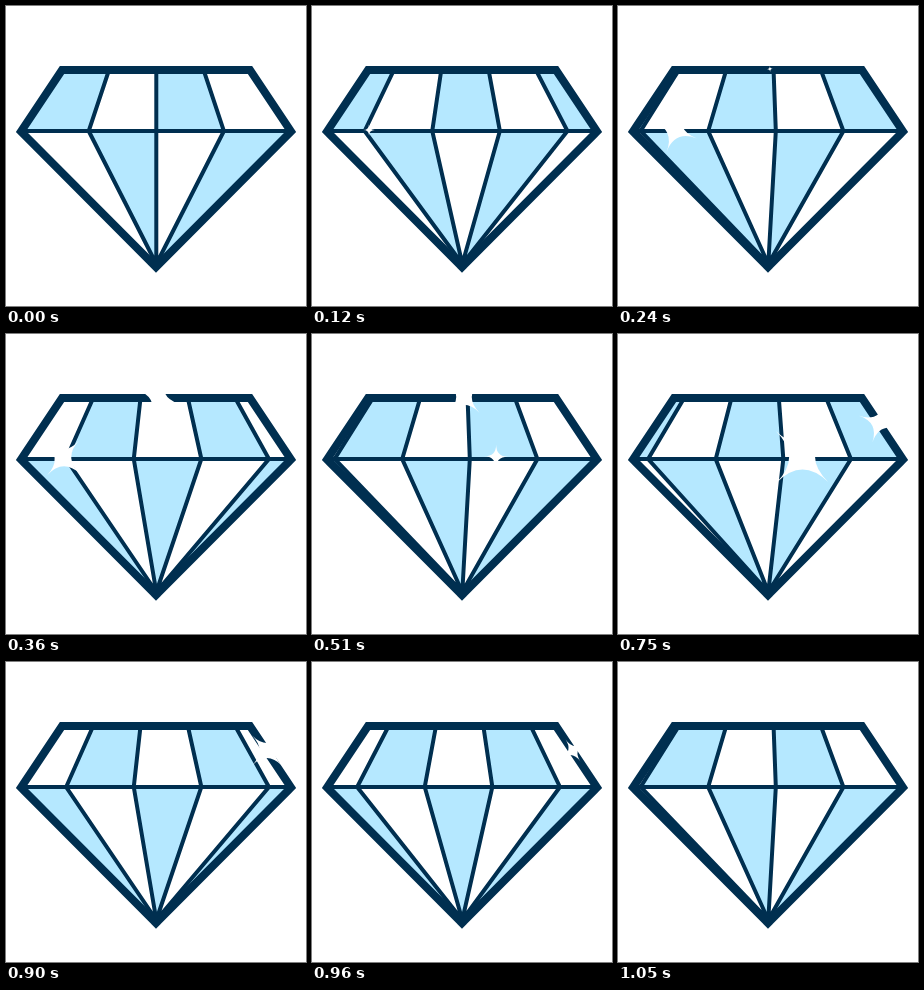
These frames come from a looping animation (300 px wide and 300 px high, 1080 ms). An HTML page:

```html
<!DOCTYPE html>
<html lang="en">
<head>
<meta charset="utf-8">
<title>Diamond</title>
<style>
  html, body { margin: 0; width: 100%; height: 100%; overflow: hidden; background: #fff; }
  svg { display: block; width: 100%; height: 100%; }
  .ink { fill: none; stroke: #002f50; stroke-width: 4; }
  .rim { stroke-width: 8; stroke-linejoin: miter; }
  #facets { fill: #b5e8ff; }
  #stars { fill: #fff; }
</style>
</head>
<body>
<svg viewBox="0 0 300 300">
  <defs>
    <path id="gem" d="M56 64H244L285 125.5L150 261L15 125.5Z"/>
    <clipPath id="inside"><use href="#gem"/></clipPath>
  </defs>
  <g clip-path="url(#inside)">
    <path id="facets"/>
    <path id="edges" class="ink"/>
  </g>
  <path class="ink" d="M18 125H282"/>
  <use href="#gem" class="ink rim"/>
  <path id="stars"/>
</svg>
<script>
  const STEP = 30, STEPS = 36, TURN = 18;
  const MID = 150.3, TOP = 64, GIRDLE = 125, TIP = 258;
  const GAP = 67.6, SPEED = 2 * GAP / TURN, TAPER = 0.7;
  const STAR_LIFE = 14;

  // x, y, peak radius, first step
  const sparkles = [
    [57, 124, 26, 3],
    [152, 63, 26, 7.5],
    [184, 122.5, 42, 15.7],
    [261, 88.5, 25, 20.5]
  ];

  const setPath = (id, d) => document.getElementById(id).setAttribute('d', d);
  const crownX = x => MID + (x - MID) * TAPER;

  function star([x, y, peak, start], step) {
    const age = step - start;
    if (age <= 0 || age >= STAR_LIFE) return '';
    const r = peak * Math.sin(Math.PI * age / STAR_LIFE);
    const turn = (5.4 * age - 6) * Math.PI / 180;
    const point = i => {
      const a = turn + i * Math.PI / 2;
      return `${x + r * Math.cos(a)} ${y + r * Math.sin(a)}`;
    };
    return `M${point(0)}` + [1, 2, 3, 4].map(i => `Q${x} ${y} ${point(i)}`).join('') + 'Z';
  }

  function draw(step) {
    const shift = MID - SPEED * (step % TURN);
    let facets = '', edges = '';
    for (let k = -3; k <= 5; k++) {
      const a = shift + GAP * k, b = a + GAP;
      facets += k % 2
        ? `M${a} ${GIRDLE}H${b}L${MID} ${TIP}Z`
        : `M${a} ${GIRDLE}H${b}L${crownX(b)} ${TOP}H${crownX(a)}Z`;
      // Edges beyond the girdle are on the hidden side
      if (a > 18 && a < 282) edges += `M${crownX(a)} ${TOP}L${a} ${GIRDLE}L${MID} ${TIP}`;
    }
    setPath('facets', facets);
    setPath('edges', edges);
    setPath('stars', sparkles.map(s => star(s, step)).join(''));
  }

  function tick() {
    draw(Math.floor(performance.now() / STEP) % STEPS);
    requestAnimationFrame(tick);
  }
  tick();
</script>
</body>
</html>
```
